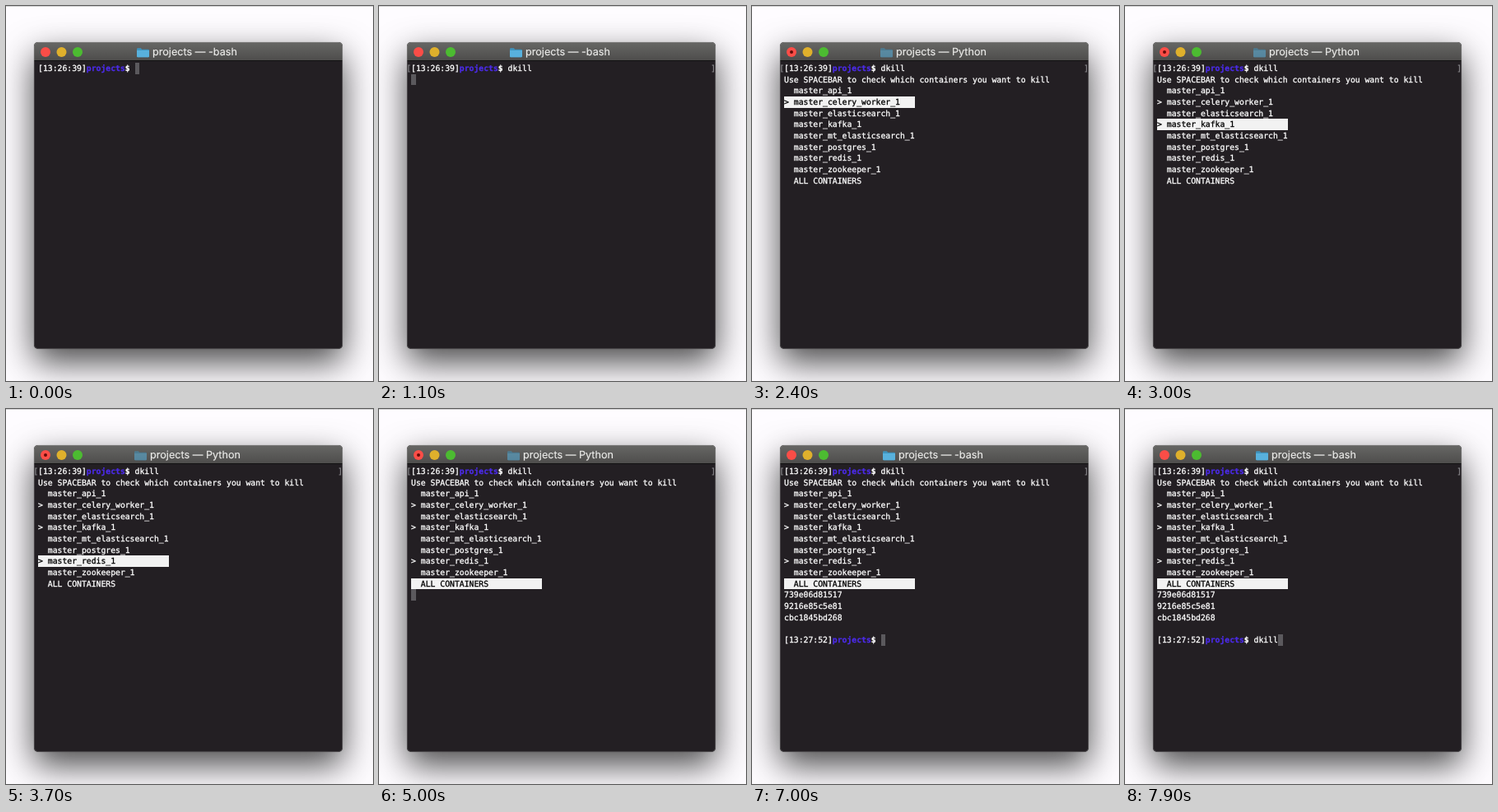
Write an HTML page that moves like this. It is 446 by 456 pixels and loops after 8000 ms.

```html
<!DOCTYPE html>
<html lang="en">
<head>
<meta charset="utf-8">
<title>dkill</title>
<style>
html, body { margin: 0; width: 100%; height: 100%; overflow: hidden; background: #fefcff; }
body { position: relative; text-rendering: geometricPrecision; }
body::before { content: ""; position: absolute; width: 100%; height: 1px; background: #d3d2d4; }
div, svg, #title { position: absolute; }
#win { left: 34px; top: 44px; width: 374.5px; height: 372.5px; border-radius: 5px; background: #231f23;
  overflow: hidden; box-shadow: 0 16px 42px rgba(0,0,0,.72), 0 0 1px rgba(0,0,0,.5); }
#win::after { content: ""; position: absolute; inset: 0; border-radius: 5px;
  box-shadow: inset 0 0 0 1px rgba(150,150,150,.28); }
#bar { width: 100%; height: 22px; background: linear-gradient(#676765, #4e4d4c);
  box-shadow: 0 1px #111; }
#title { top: 45px; font: 12.65px/24px Inter, sans-serif; color: #ececea; white-space: pre;
  -webkit-text-stroke: .15px; }
.row { left: 39.1px; height: 13.67px; white-space: pre; color: #fff;
  font: 9.76px/15px "DejaVu Sans Mono", monospace; -webkit-text-stroke: .3px; }
.row b { color: #4b2be6; }
.row b + b { color: #fff; }
.row span { display: inline-block; height: 13.67px; vertical-align: top; }
.on { background: #f2f2f2; color: #000; }
.cursor { width: 5.87px; background: #5b595d; }
.row .edge { color: #858488; }
</style>
</head>
<body>
<div id="win"><div id="bar"></div></div>
<svg width="446" height="456">
  <circle cx="48" cy="56" r="6" fill="#fb4d47"/>
  <circle id="dot" cx="48" cy="56" r="2" fill="#650b09"/>
  <circle cx="67.5" cy="56" r="6" fill="#dfb02c"/>
  <circle cx="87" cy="56" r="6" fill="#4cbb31"/>
  <g id="folder">
    <path d="M0 1.2q0-1.2 1.2-1.2h3.6l1.4 1.4h7.6q1.2 0 1.2 1.2v7.2q0 1.2-1.2 1.2h-12.6q-1.2 0-1.2-1.2z" fill="#3f93bd"/>
    <path d="M0 2.8h15v7q0 1.2-1.2 1.2h-12.6q-1.2 0-1.2-1.2z" fill="#58b1dd"/>
  </g>
</svg>
<span id="title"></span>
<div id="screen"></div>
<script>
const $ = id => document.getElementById(id);
const TOP = 69, LINE = 13.67, LEFT = 39.1, CHAR = 5.875, LOOP = 8000;
const items = [...["api", "celery_worker", "elasticsearch", "kafka", "mt_elasticsearch",
  "postgres", "redis", "zookeeper"].map(s => `master_${s}_1`), "ALL CONTAINERS"];
const ids = ["739e06d81517", "9216e85c5e81", "cbc1845bd268"];

// Each step is [time, value]; the latest one reached wins.
const typed = [[0, 0], [100, 1], [400, 2], [500, 3], [600, 4], [800, 5]];
const retyped = [[0, 0], [7600, 1], [7700, 2], [7800, 4], [7900, 5]];
const selected = [[0, 0], [2200, 1], [2600, 2], [2700, 3], [3200, 5], [3400, 6], [3900, 7], [4100, 8]];
const checked = { 1: 2400, 3: 2900, 6: 3600 };
const printed = [[0, 0], [5500, 1], [5600, 3]];
const at = (steps, t) => steps.filter(s => s[0] <= t).pop()[1];

const cursor = '<span class="cursor"></span>';
const prompt = (clock, n) => `[${clock}]<b>projects</b><b>$</b> ${"dkill".slice(0, n)}`;
const row = (i, html, col = 0) =>
  `<div class="row" style="top:${TOP + i * LINE}px;left:${LEFT + col * CHAR}px">${html}</div>`;

function screen(t) {
  const entered = t >= 1100;
  let out = row(0, prompt("13:26:39", at(typed, t)) + (entered ? "" : cursor));
  if (!entered) return out;
  out += row(0, '<span class="edge">[</span>', -1) + row(0, '<span class="edge">]</span>', 62);
  if (t < 1500) return out + row(1, cursor);

  out += row(1, "Use SPACEBAR to check which containers you want to kill");
  items.forEach((name, i) => {
    const text = (t >= checked[i] ? "&gt; " : "  ") + name;
    const pad = " ".repeat(25 - name.length);
    out += row(i + 2, i === at(selected, t) ? `<span class="on">${text}${pad}</span>` : text);
  });
  if (t < 5000) return out;

  const n = at(printed, t);
  for (let i = 0; i < n; i++) out += row(11 + i, ids[i]);
  return out + (t < 5700 ? row(11 + n, cursor)
    : row(15, prompt("13:27:52", at(retyped, t)) + cursor));
}

let last;
function draw() {
  const t = performance.now() % LOOP;
  const html = screen(t);
  if (html !== last) $("screen").innerHTML = last = html;
  const busy = t >= 1200 && t < 5700;
  $("title").textContent = "projects — " + (busy ? "Python" : "-bash");
  $("title").style.left = (busy ? 175 : 178) + "px";
  $("folder").setAttribute("transform", `translate(${busy ? 156 : 159} 51.3)`);
  $("folder").setAttribute("opacity", busy ? .55 : 1);
  $("dot").setAttribute("visibility", busy ? "visible" : "hidden");
  requestAnimationFrame(draw);
}
draw();
</script>
</body>
</html>
```
